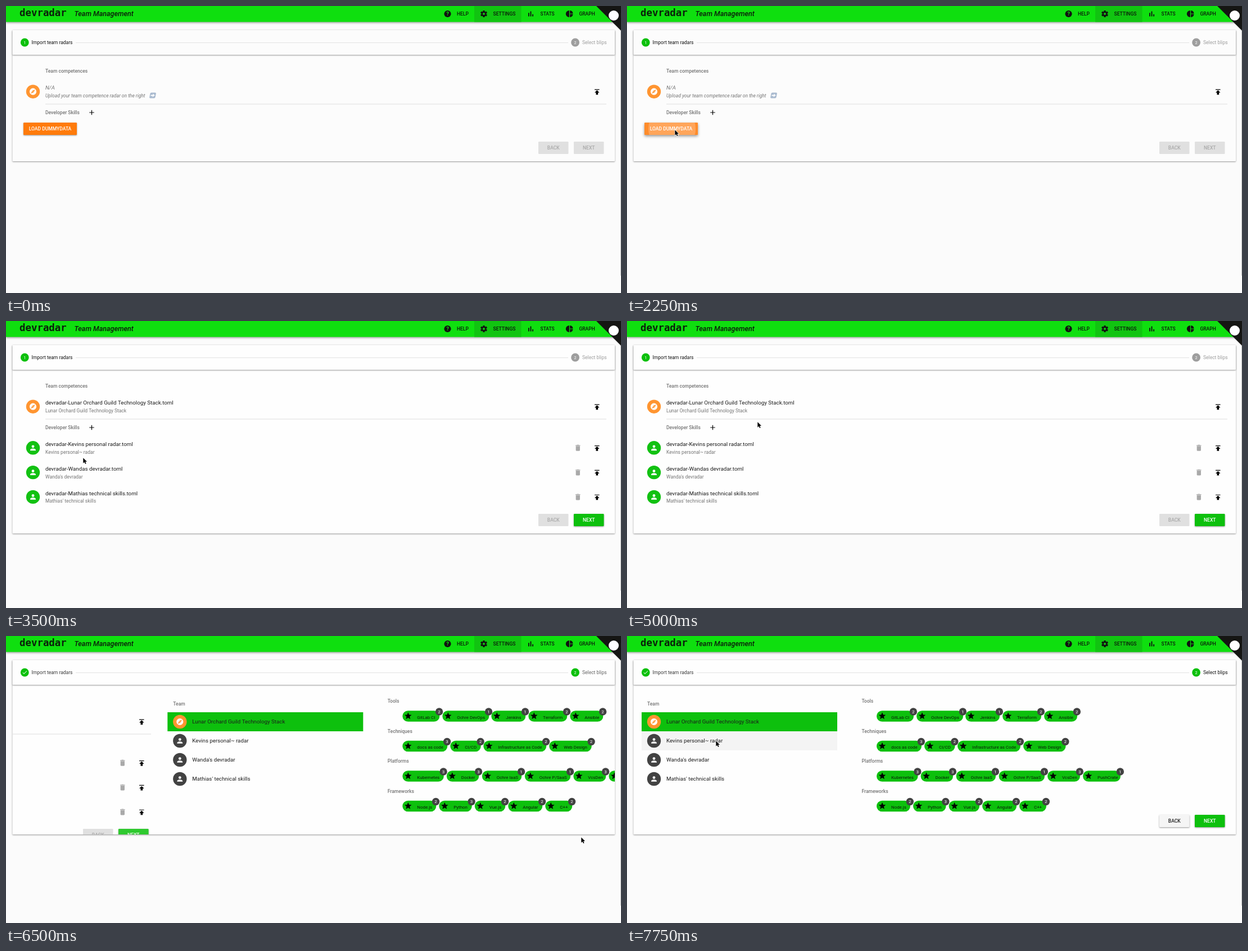
An HTML page with a canvas for the animation above (8000 ms loop, 1094 by 512 pixels).

```html
<!DOCTYPE html>
<html lang="en">
<head>
<meta charset="utf-8">
<title>Team Management</title>
<style>
  html, body { margin: 0; width: 100%; height: 100%; overflow: hidden; background: #fafafa; }
  canvas { display: block; }
</style>
</head>
<body>
<canvas id="stage" width="1094" height="512"></canvas>
<script>
const ctx = document.getElementById('stage').getContext('2d');
const LOOP = 8000, STEP = 250;
const GREEN = '#0dc00d', ORANGE = '#ff9531', DARK = '#424242', GREY = '#757575', INK = '#1c1c1c';
const SMALL = 8.53, TITLE = 9.75;

// Icons on a 24 unit grid
const ICONS = {
  publish: 'M5 4v2h14V4zM5 14h4v6h6v-6h4l-7-7z',
  trash: 'M6 19c0 1.1.9 2 2 2h8c1.1 0 2-.9 2-2V7H6zM19 4h-3.5l-1-1h-5l-1 1H5v2h14z',
  bars: 'M5 9.2h2.8V19H5zM10.6 5h2.8v14h-2.8zM16.2 13H19v6h-2.8z',
  pie: 'M11 2v20a10 10 0 0 1 0-20zM13 2v9h9a10 10 0 0 0-9-9zM13 13v9a10 10 0 0 0 9-9z',
  compass: 'M12 10.9a1.1 1.1 0 1 0 0 2.2 1.1 1.1 0 0 0 0-2.2zM12 2a10 10 0 1 0 0 20 10 10 0 0 0 0-20zM14.2 14.2 6 18l3.8-8.2L18 6z',
  person: 'M12 12a4 4 0 1 0 0-8 4 4 0 0 0 0 8zM12 14c-2.7 0-8 1.3-8 4v2h16v-2c0-2.7-5.3-4-8-4z',
  plus: 'M19 13h-6v6h-2v-6H5v-2h6V5h2v6h6z',
  check: 'M9 16.2 4.8 12l-1.4 1.4L9 19 21 7l-1.4-1.4z',
  star: 'M12 17.3 18.2 21l-1.7-7L22 9.2l-7.2-.6L12 2 9.2 8.6 2 9.2 7.5 14l-1.7 7z'
};
for (const name in ICONS) ICONS[name] = new Path2D(ICONS[name]);
const ARROW = new Path2D('M0 0V9.4l2.2-2 1.5 3.3 1.6-.7-1.5-3.2h2.9z');

const TEAM = 'Lunar Orchard Guild Technology Stack';
const MEMBERS = [
  ['devradar-Kevins personal radar.toml', 'Kevins personal~ radar'],
  ['devradar-Wandas devradar.toml', "Wanda's devradar"],
  ['devradar-Mathias technical skills.toml', "Mathias' technical skills"]
];

// label, count, left, right
const GROUPS = [
  ['Tools', [['GitLab CI', 2, 444, 510], ['Ochre DevOps', 1, 515, 598], ['Jenkins', 1, 602, 663],
    ['Terraform', 2, 668, 737], ['Ansible', 2, 742, 801]]],
  ['Techniques', [['docs as code', 3, 444, 524], ['CI/CD', 2, 529, 583.5],
    ['Infrastructure as Code', 2, 588, 700], ['Web Design', 2, 705, 780.5]]],
  ['Platforms', [['Kubernetes', 3, 444, 517.5], ['Docker', 3, 522.5, 580], ['Ochre IaaS', 1, 585.5, 656],
    ['Ochre P/SaaS', 1, 661.5, 743], ['VcsDen', 3, 748, 806], ['PushCrate', 1, 811, 878]]],
  ['Frameworks', [['Node.js', 2, 444, 504], ['Python', 3, 509, 567.5], ['Vue.js', 2, 572.5, 627],
    ['Angular', 2, 632, 693], ['C++', 2, 698, 746]]]
];

// time, x, y of the pointer tip
const POINTER = [
  [250, 505, 166], [500, 400, 252], [1000, 289, 253], [1250, 32, 218], [1500, 83, 219],
  [1750, 85, 221], [3250, 98, 232], [3500, 137, 244], [3750, 200, 234], [4000, 198, 159],
  [5000, 232, 180], [5250, 835, 336], [5500, 1023, 359], [7000, 665, 283],
  [7250, 330, 150], [7750, 158, 187]
];

function text(str, x, cy, size = SMALL, color = INK, { style = '', align = 'left', family = 'Roboto, sans-serif' } = {}) {
  ctx.font = `${style} ${size}px ${family}`;
  ctx.textAlign = align;
  ctx.fillStyle = color;
  ctx.fillText(str, x, cy + size * 0.355);
}

function rect(x, y, w, h, color) {
  ctx.fillStyle = color;
  ctx.fillRect(x, y, w, h);
}

function rounded(x, y, w, h, r, color, lift = 0) {
  ctx.save();
  if (lift) {
    ctx.shadowColor = 'rgba(0,0,0,.42)';
    ctx.shadowBlur = lift * 2.4;
    ctx.shadowOffsetY = lift;
  }
  ctx.fillStyle = color;
  ctx.beginPath();
  ctx.roundRect(x, y, w, h, r);
  ctx.fill();
  ctx.restore();
}

function disc(x, y, r, color) {
  ctx.fillStyle = color;
  ctx.beginPath();
  ctx.arc(x, y, r, 0, Math.PI * 2);
  ctx.fill();
}

function icon(name, x, y, color = '#000', size = 14.6) {
  ctx.save();
  ctx.translate(x - size / 2, y - size / 2);
  ctx.scale(size / 24, size / 24);
  ctx.fillStyle = color;
  ctx.fill(ICONS[name], 'evenodd');
  ctx.restore();
}

function avatar(name, y, color) {
  disc(48, y, 12.2, color);
  icon(name, 48, y, '#fff');
}

function gear(x, y, hole) {
  ctx.save();
  ctx.translate(x, y);
  disc(0, 0, 4.5, '#111');
  for (let i = 0; i < 6; i++) {
    ctx.rotate(Math.PI / 3);
    rect(-1.6, -6.1, 3.2, 4, '#111');
  }
  disc(0, 0, 2.1, hole);
  ctx.restore();
}

function button(label, x, y, w, fill, color, { lift = 1, glow = 0, ripple } = {}) {
  rounded(x, y, w, 22, 1.3, fill, lift);
  if (glow) rounded(x, y, w, 22, 1.3, `rgba(255,255,255,${glow})`);
  if (ripple) {
    ctx.save();
    ctx.beginPath();
    ctx.rect(x, y, w, 22);
    ctx.clip();
    disc(x + ripple[0], y + 11, ripple[1], 'rgba(255,255,255,.22)');
    ctx.restore();
  }
  text(label, x + w / 2, y + 11, SMALL, color, { style: '500', align: 'center' });
}

const disabledButton = (label, x, y) => button(label, x, y, 53.5, '#e0e0e0', '#a9a9a9', { lift: 0 });
const subheader = (label, x, y) => text(label, x, y, SMALL, GREY, { style: '500' });

function toolbar() {
  const green = '#0fdf0f', active = '#11c411';
  rounded(0, -5, 1094, 33.5, 0, green, 1.6);
  rect(833, 0, 83.5, 28.5, active);
  text('devradar', 24, 12, 17.4, '#0b200b', { style: 'bold', family: '"DejaVu Sans Mono", monospace' });
  text('Team Management', 121.5, 14, 12.5, '#0b1a0b', { style: 'italic 500' });
  disc(785.5, 14, 6.1, '#111');
  text('?', 785.5, 14, 9.5, green, { style: 'bold', align: 'center' });
  gear(850, 14, active);
  icon('bars', 933.5, 14, '#111', 15.5);
  icon('pie', 1002.5, 14, '#111');
  [['HELP', 802], ['SETTINGS', 866.5], ['STATS', 950.5], ['GRAPH', 1019.5]]
    .forEach(([label, x]) => text(label, x, 14, SMALL, '#0b1a0b', { style: '500' }));
  ctx.fillStyle = '#151513';
  ctx.beginPath();
  ctx.moveTo(1050, 0);
  ctx.lineTo(1094, 0);
  ctx.lineTo(1094, 44);
  ctx.fill();
  disc(1081, 17, 9, '#fff');
}

function stepper(t, paper) {
  const second = t >= 6500;
  rounded(11.5, 43, 1071.5, 44, 1, paper, 1);
  rect(124, 65, 876, 1, '#e2e2e2');
  disc(33.3, 65, 7.4, GREEN);
  if (second) icon('check', 33.3, 65, '#fff', 10.5);
  else text('1', 33.3, 65, 7.3, '#fff', { align: 'center' });
  text('Import team radars', 45.5, 65, SMALL, second ? '#3a3a3a' : '#111');
  disc(1012.6, 65, 7.4, second ? GREEN : '#9e9e9e');
  text('2', 1012.6, 65, 7.3, '#fff', { align: 'center' });
  text('Select blips', 1025, 65, SMALL, t >= 6750 ? '#111' : second ? '#666' : '#9e9e9e');
}

function uploadHint() {
  text('N/A', 70, 146, TITLE, GREY, { style: 'italic' });
  text('Upload your team competence radar on the right', 70, 160, SMALL, GREY, { style: 'italic' });
  ctx.save();
  ctx.transform(1, 0, -0.2, 1, 261, 159.5);
  rounded(-5.2, -5, 10.4, 10, 1.8, '#a9bacf');
  rect(-3.6, -1, 4, 2, '#fff');
  ctx.beginPath();
  ctx.moveTo(0, -3);
  ctx.lineTo(3.8, 0);
  ctx.lineTo(0, 3);
  ctx.fill();
  ctx.restore();
}

function importStep(t) {
  const loaded = t >= 2500;
  subheader('Team competences', 70, 116);
  avatar('compass', 152.7, ORANGE);
  icon('publish', 1051.3, 153.3);
  rect(70, 174.5, 998, 1, '#e0e0e0');
  subheader('Developer Skills', 70, 190);
  icon('plus', 152.5, 190);

  if (!loaded) {
    uploadHint();
    const clicked = t >= 2250;
    button('LOAD DUMMYDATA', 31, 208, 95, '#ff7b0b', '#fff',
      { lift: clicked ? 2.2 : 1, glow: t >= 1500 ? 0.13 : 0, ripple: clicked && [49, 42] });
    disabledButton('BACK', 947, 242);
    disabledButton('NEXT', 1010, 242);
    return;
  }

  const settled = t >= 2750;
  text(`devradar-${TEAM}.toml`, 70, 146, TITLE, settled ? INK : '#555');
  text(TEAM, 70, 160, SMALL, GREY);
  MEMBERS.forEach(([file, name], i) => {
    const y = 226.3 + i * 43.8;
    avatar('person', y, '#12c112');
    text(file, 70, y - 6.6, TITLE, settled ? INK : '#555');
    text(name, 70, y + 7.4, SMALL, GREY);
    icon('trash', 1017.3, y, '#a9a9a9');
    icon('publish', 1051.3, y + 0.6);
  });
  disabledButton('BACK', 947, 344);
  const clicked = t >= 6250 && t < 6500;
  button('NEXT', 1010, 344, 53.5, settled ? GREEN : '#6fce6f', '#fff', {
    lift: clicked ? 2.2 : 1,
    glow: t >= 5750 ? 0.14 : t >= 5500 ? 0.07 : 0,
    ripple: clicked && [24.5, 22]
  });
}

function chip([label, count, left, right], y) {
  rounded(left, y - 9.8, right - left, 19.6, 9.8, GREEN);
  icon('star', left + 10, y - 0.5, '#000', 15);
  text(label, left + 26, y + 1.8, 7.9, '#0b1a0b');
  disc(right - 0.7, y - 8, 6.7, DARK);
  text(String(count), right - 0.7, y - 8, 8, '#fff', { align: 'center' });
}

function blipStep(t) {
  subheader('Team', 36, 121);
  const hovered = t >= 7750 ? 1 : t >= 7250 ? 0 : -1;
  [TEAM, ...MEMBERS.map(m => m[1])].forEach((name, i) => {
    const y = 153 + i * 34;
    if (i === 0) rect(26, 136, 348, 34, GREEN);
    if (i === hovered) rect(26, y - 17, 348, 34, 'rgba(0,0,0,.04)');
    avatar(i ? 'person' : 'compass', y, i ? DARK : ORANGE);
    text(name, 70, y, TITLE, INK);
  });
  GROUPS.forEach(([title, chips], i) => {
    const y = 116 + i * 53.5;
    subheader(title, 417.5, y);
    chips.forEach(c => chip(c, y + 27));
  });
  button('BACK', 947, 319, 53.5, '#f5f5f5', INK);
  button('NEXT', 1010, 319, 53.5, GREEN, '#fff');
}

function shifted(dx, draw, t) {
  ctx.save();
  ctx.translate(dx, 0);
  draw(t);
  ctx.restore();
}

function pointer(t) {
  const spot = POINTER.filter(p => p[0] <= t).pop();
  if (!spot) return;
  ctx.save();
  ctx.translate(spot[1] + 0.3, spot[2] + 0.3);
  ctx.strokeStyle = '#fff';
  ctx.lineWidth = 1.4;
  ctx.stroke(ARROW);
  ctx.fillStyle = '#000';
  ctx.fill(ARROW);
  ctx.restore();
}

function draw(t) {
  const paper = t < 2500 ? '#fcfcfc' : '#fefefe';
  const bottom = t < 2500 ? 277 : t < 6500 ? 379 : 354;
  rect(0, 0, 1094, 512, '#fbfbfb');
  rect(1093, 40, 1, 441, '#c4c4c4');
  rounded(11.5, 43, 1071.5, bottom - 43, 1, paper, 1);

  ctx.save();
  ctx.beginPath();
  ctx.rect(11.5, 87, 1071.5, bottom - 87);
  ctx.clip();
  if (t < 6500) importStep(t);
  else if (t < 6750) {
    shifted(-810, importStep, t);
    shifted(261.3, blipStep, t);
  } else blipStep(t);
  ctx.restore();

  stepper(t, paper);
  toolbar();
  pointer(t);
}

function tick() {
  const t = performance.now() % LOOP;
  draw(Math.floor(t / STEP) * STEP);
  requestAnimationFrame(tick);
}
tick();
</script>
</body>
</html>
```
